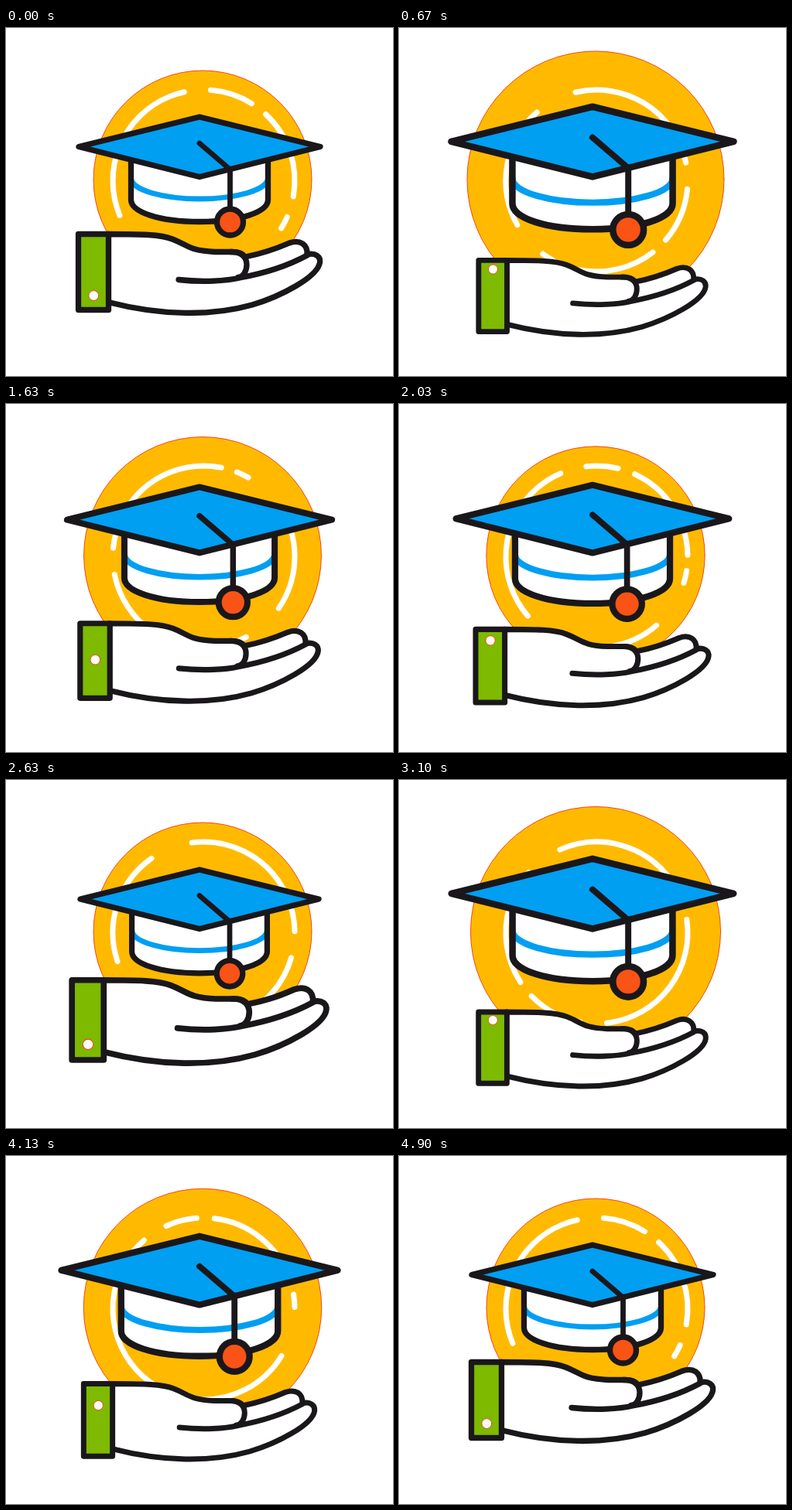
Animation of 500 by 450 pixels, one loop 5010 ms. Source, as an HTML page with a canvas:

```html
<!DOCTYPE html>
<html lang="en">
<head>
<meta charset="utf-8">
<title>Graduation cap over a hand</title>
<style>
html, body { margin: 0; width: 100%; height: 100%; overflow: hidden; background: #fff; }
canvas { display: block; width: 500px; height: 450px; }
</style>
</head>
<body>
<canvas id="stage" width="500" height="450"></canvas>
<script>
const ctx = document.getElementById('stage').getContext('2d');

const LOOP = 5010, STEP = 100 / 3, BEAT = 600, END = 4800, PULSE = 2600;
const INK = '#1a171b', YELLOW = '#ffba00', BLUE = '#009ff2',
      GREEN = '#7dba00', RED = '#f95316', RIM = '#f4451a';

const shape = {
  board: new Path2D('M250 115 L406 153.5 L250 192.5 L94 153.5 Z'),
  crown: new Path2D('M161.5 165 V222 C161.5 238 198 250.5 250 250.5 C302 250.5 338.5 238 338.5 222 V165'),
  band: new Path2D('M161.5 194 C161.5 210 205 221 250 221 C295 221 338.5 210 338.5 194'),
  cord: new Path2D('M250 149 L289.5 183 V234'),
  cuff: new Path2D('M93.5 266.5 H132.5 V364.5 H93.5 Z'),
  hand: new Path2D('M132 266.5 C175 266.5 200 267 215 273 C236 281 236 288 270 289.5 L293 289.5 ' +
    'C301 289.5 306 292 309 296 C335 291 350 285 366 278 C380 273 390 280 389 293 ' +
    'C400 290 406.5 296 405.5 303 C403 322 355 347 318 358 C265 373 200 372 132 354.5 Z'),
  thumb: new Path2D('M290 289.5 C306 289 311 298 311 306 C311 315 306 322 300 322.5'),
  palm: new Path2D('M223 325.5 C255 329 285 327 302 323 C335 317 365 307 389 294')
};

const mix = (a, b, u) => a + (b - a) * u;
const ease = u => (1 - Math.cos(Math.PI * u)) / 2;
const wave = turns => Math.sin(2 * Math.PI * turns);

// Eased value at time t along [time, value] points.
function along(points, t) {
  let i = 0;
  while (i < points.length - 2 && t >= points[i + 1][0]) i++;
  const [t0, v0] = points[i], [t1, v1] = points[i + 1];
  return mix(v0, v1, ease((t - t0) / (t1 - t0)));
}

// Leaves rest, swings between high and low on every beat, returns to rest.
function swing(t, rest, high, low, lag = 0) {
  const points = [[0, rest]];
  for (let i = 1; i < END / BEAT; i++) points.push([i * BEAT + lag, i % 2 ? high : low]);
  points.push([END, rest]);
  return along(points, t);
}

function paint(path, fill, line = INK, width = 7.3) {
  if (fill) {
    ctx.fillStyle = fill;
    ctx.fill(path);
  }
  if (line) {
    ctx.strokeStyle = line;
    ctx.lineWidth = width;
    ctx.stroke(path);
  }
}

function disc(x, y, r) {
  const path = new Path2D();
  path.arc(x, y, r, 0, Math.PI * 2);
  return path;
}

// Draws in a space that is scaled about (x, y) and lifted by dy.
function scaled(x, y, scale, dy, drawParts) {
  ctx.save();
  ctx.translate(x, y + dy);
  ctx.scale(scale, scale);
  ctx.translate(-x, -y);
  drawParts();
  ctx.restore();
}

function drawDisc(t) {
  const beats = [[0, 141], [600, 166], [1000, 130], [1500, 154], [2000, 141], [PULSE, 141]];
  paint(disc(254, 196, along(beats, t % PULSE)), YELLOW, RIM, 1);
}

// Dashes run round twice while their ends sway against each other.
function drawRing(t) {
  const u = t / END;
  const turn = 720 * u + 100 * Math.sin(Math.PI * u * u);
  const sway = 4 * wave(2 * u);
  const dashes = [[23.5, 8], [60, 70], [157.6, 100], [274.4, 27.4], [313, 57]];
  dashes.forEach(([from, size], i) => {
    const grow = i ? sway * (i % 2 ? 1 : -1) : 0;
    const edge = angle => (angle + turn) * Math.PI / 180;
    const dash = new Path2D();
    dash.arc(255.5, 197.5, 117.5, edge(from - grow), edge(from + size + grow));
    paint(dash, null, '#fff', 7);
  });
}

function drawHand(t) {
  scaled(249.5, 315.5, swing(t, 1, 0.94, 1.078), swing(t, 0, 31, -13), () => {
    paint(shape.hand, '#fff');
    paint(shape.thumb);
    paint(shape.palm);
    paint(shape.cuff, GREEN);
    paint(disc(113.3, swing(t, 346, 277, 350, 70), 6.4), '#fff', RIM, 1);
  });
}

function drawCap(t) {
  scaled(250, 193, swing(t, 1, 1.17, 0.948), 0, () => {
    paint(shape.crown, '#fff', null);
    paint(shape.band, null, BLUE, 7);
    paint(shape.crown);
    paint(shape.board, BLUE);
    paint(shape.cord, null, INK, 6.8);
    paint(disc(289.5, 251, 17), RED);
  });
}

function draw(now) {
  // Thirty pictures a second, with a short hold at both ends.
  const tick = Math.floor((Math.floor((now % LOOP) / 10) * 10 + 5) / STEP);
  const t = Math.min(END, Math.max(0, (tick - 2) * STEP));
  ctx.fillStyle = '#fff';
  ctx.fillRect(0, 0, 500, 450);
  ctx.lineCap = ctx.lineJoin = 'round';
  drawDisc(t);
  drawRing(t);
  drawHand(t);
  drawCap(t);
}

const start = performance.now();
function frame() {
  draw(performance.now() - start);
  requestAnimationFrame(frame);
}
frame();
</script>
</body>
</html>
```
